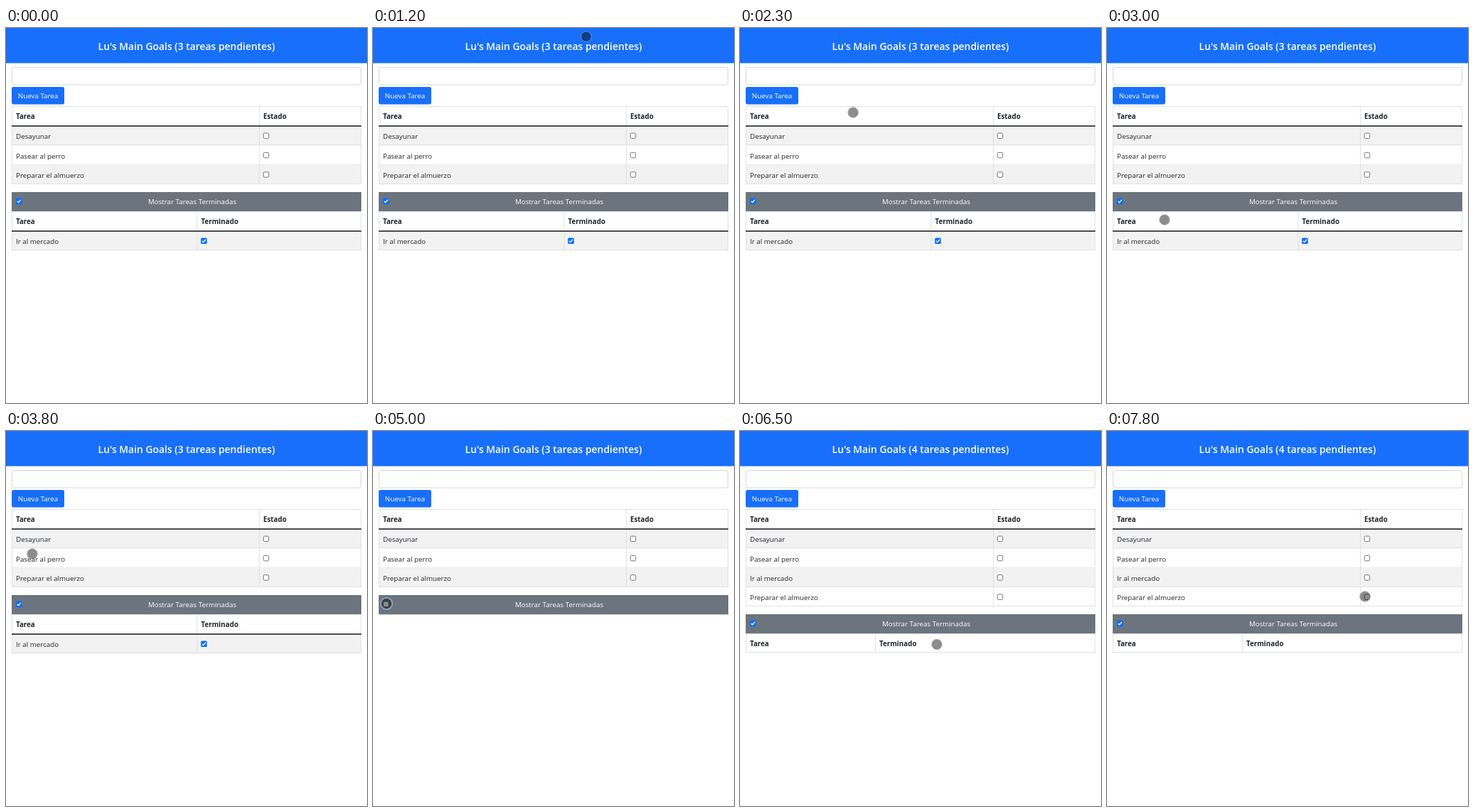
These frames come from a looping animation (508x528 px, 8000 ms). An HTML page with a canvas:

```html
<!DOCTYPE html>
<html lang="es">
<head>
<meta charset="utf-8">
<title>Tareas</title>
<style>
html, body { margin: 0; width: 100%; height: 100%; overflow: hidden; background: #fff; }
canvas { display: block; width: 508px; height: 528px; }
</style>
</head>
<body>
<canvas id="stage"></canvas>
<script>
const W = 508, H = 528, LOOP = 8000, STEP = 100;
const LEFT = 8, RIGHT = 500, ROW = 27.3;
const BLUE = '#176ffb', INK = '#212529', LINE = '#dee2e6', STRIPE = '#f2f2f2', SLATE = '#6c757d';
const FAMILY = '"Open Sans", "Noto Sans", sans-serif';

const canvas = document.getElementById('stage');
const ctx = canvas.getContext('2d');
const ratio = window.devicePixelRatio || 1;
canvas.width = W * ratio;
canvas.height = H * ratio;

// Pointer keys: time, x, y
const path = [
  [1200, 300, 12], [1400, 190, 60], [1700, 60, 115], [2000, 52, 150],
  [2200, 120, 106], [2450, 198, 160], [2700, 110, 235], [3000, 81, 270],
  [3300, 103, 235], [3550, 70, 190], [3800, 37, 173], [4200, 19, 243],
  [5300, 19, 243], [6200, 278, 300.5], [6300, 278, 301], [6500, 277, 300.5],
  [6800, 277, 300.5], [7200, 114, 298], [7700, 362, 233], [7800, 363, 233]
];
const HIDE = 4400, SHOW = 5200, UNDO = 6500;

function slope(i, axis) {
  if (i <= 0 || i >= path.length - 1) return 0;
  const d = k => (path[k + 1][axis] - path[k][axis]) / (path[k + 1][0] - path[k][0]);
  const a = d(i - 1), b = d(i);
  return a * b <= 0 ? 0 : 2 * a * b / (a + b);
}

function along(t, axis) {
  const last = path.length - 1;
  if (t >= path[last][0]) return path[last][axis];
  let i = 0;
  while (path[i + 1][0] <= t) i++;
  const span = path[i + 1][0] - path[i][0];
  const u = (t - path[i][0]) / span, v = 1 - u;
  return v * v * (1 + 2 * u) * path[i][axis] + u * u * (3 - 2 * u) * path[i + 1][axis]
    + span * u * v * (v * slope(i, axis) - u * slope(i + 1, axis));
}

function rect(x, y, w, h, fill) {
  ctx.fillStyle = fill;
  ctx.fillRect(x, y, w, h);
}

function rounded(x, y, w, h, r, fill, stroke) {
  ctx.beginPath();
  ctx.roundRect(x, y, w, h, r);
  if (fill) { ctx.fillStyle = fill; ctx.fill(); }
  if (stroke) { ctx.strokeStyle = stroke; ctx.lineWidth = 1; ctx.stroke(); }
}

function text(str, x, y, { color = INK, weight = 400, size = 9.8, align = 'left' } = {}) {
  ctx.font = `${weight} ${size}px ${FAMILY}`;
  ctx.fillStyle = color;
  ctx.textAlign = align;
  ctx.fillText(str, x, y);
}

function checkbox(x, y, on) {
  if (!on) {
    rounded(x - 3.7, y - 3.7, 7.4, 7.4, 1.3, '#fff', '#767676');
    return;
  }
  rounded(x - 4.3, y - 4.3, 8.6, 8.6, 1.5, '#0d6efd');
  ctx.beginPath();
  ctx.moveTo(x - 2.5, y);
  ctx.lineTo(x - 0.8, y + 1.8);
  ctx.lineTo(x + 2.6, y - 2);
  ctx.strokeStyle = '#fff';
  ctx.lineWidth = 1.3;
  ctx.stroke();
}

function table(top, split, heads, rows, on) {
  const bottom = top + 28 + rows.length * ROW - (rows.length ? 0 : 0.7);
  rows.forEach((name, i) => {
    const y = top + 28 + i * ROW;
    if (i % 2 === 0) rect(LEFT, y, RIGHT - LEFT, ROW, STRIPE);
    rect(LEFT, Math.round(y + ROW) - 1, RIGHT - LEFT, 1, LINE);
    text(name, 14, y + 18.2);
    checkbox(split + 10, y + 13.8, on);
  });
  rect(LEFT, top, RIGHT - LEFT, 1, LINE);
  rect(LEFT, Math.round(bottom) - 1, RIGHT - LEFT, 1, LINE);
  for (const x of [LEFT, split, RIGHT - 1]) rect(x, top, 1, bottom - top, LINE);
  if (rows.length) rect(LEFT, top + 27.2, RIGHT - LEFT, 1.6, INK);
  text(heads[0], 14, top + 18, { weight: 700 });
  text(heads[1], split + 6, top + 18, { weight: 700 });
}

function pointer(t) {
  if (t < path[0][0]) return;
  const x = along(t, 1), y = along(t, 2);
  ctx.beginPath();
  ctx.arc(x, y, 7, 0, 7);
  ctx.fillStyle = 'rgba(0,0,0,.45)';
  ctx.fill();
  const focused = t >= HIDE && t < 5400;
  ctx.beginPath();
  ctx.arc(x, y, focused ? 8.3 : 7.3, 0, 7);
  ctx.strokeStyle = focused ? '#86a9d2' : 'rgba(150,150,150,.75)';
  ctx.lineWidth = focused ? 1.6 : 1;
  ctx.stroke();
}

function draw(t) {
  const undone = t >= UNDO, open = t < HIDE || t >= SHOW;
  const todo = ['Desayunar', 'Pasear al perro', 'Preparar el almuerzo'];
  const done = undone ? [] : ['Ir al mercado'];
  if (undone) todo.splice(2, 0, 'Ir al mercado');

  ctx.setTransform(ratio, 0, 0, ratio, 0, 0);
  rect(0, 0, W, H, '#fff');
  rect(0, 0, W, 49.5, BLUE);
  text(`Lu's Main Goals (${todo.length} tareas pendientes)`, 254, 31,
    { color: '#fff', weight: 600, size: 13.9, align: 'center' });

  rounded(8.5, 55.5, 491, 24.5, 2.5, '#fff', '#d3d8dd');
  rounded(8, 83, 74, 24.5, 2.5, BLUE);
  text('Nueva Tarea', 45, 99.2, { color: '#fff', align: 'center' });

  table(110, 356, ['Tarea', 'Estado'], todo, false);

  const bar = undone ? 258 : 231;
  rect(LEFT, bar, RIGHT - LEFT, 27.3, SLATE);
  checkbox(18.3, bar + 12.9, open);
  text('Mostrar Tareas Terminadas', 262, bar + 17.4, { color: '#fff', align: 'center' });
  if (open) table(bar + 27, undone ? 190 : 268.5, ['Tarea', 'Terminado'], done, true);

  pointer(t);
}

function frame(now) {
  draw(Math.floor(now % LOOP / STEP) * STEP);
  requestAnimationFrame(frame);
}
requestAnimationFrame(frame);
</script>
</body>
</html>
```
